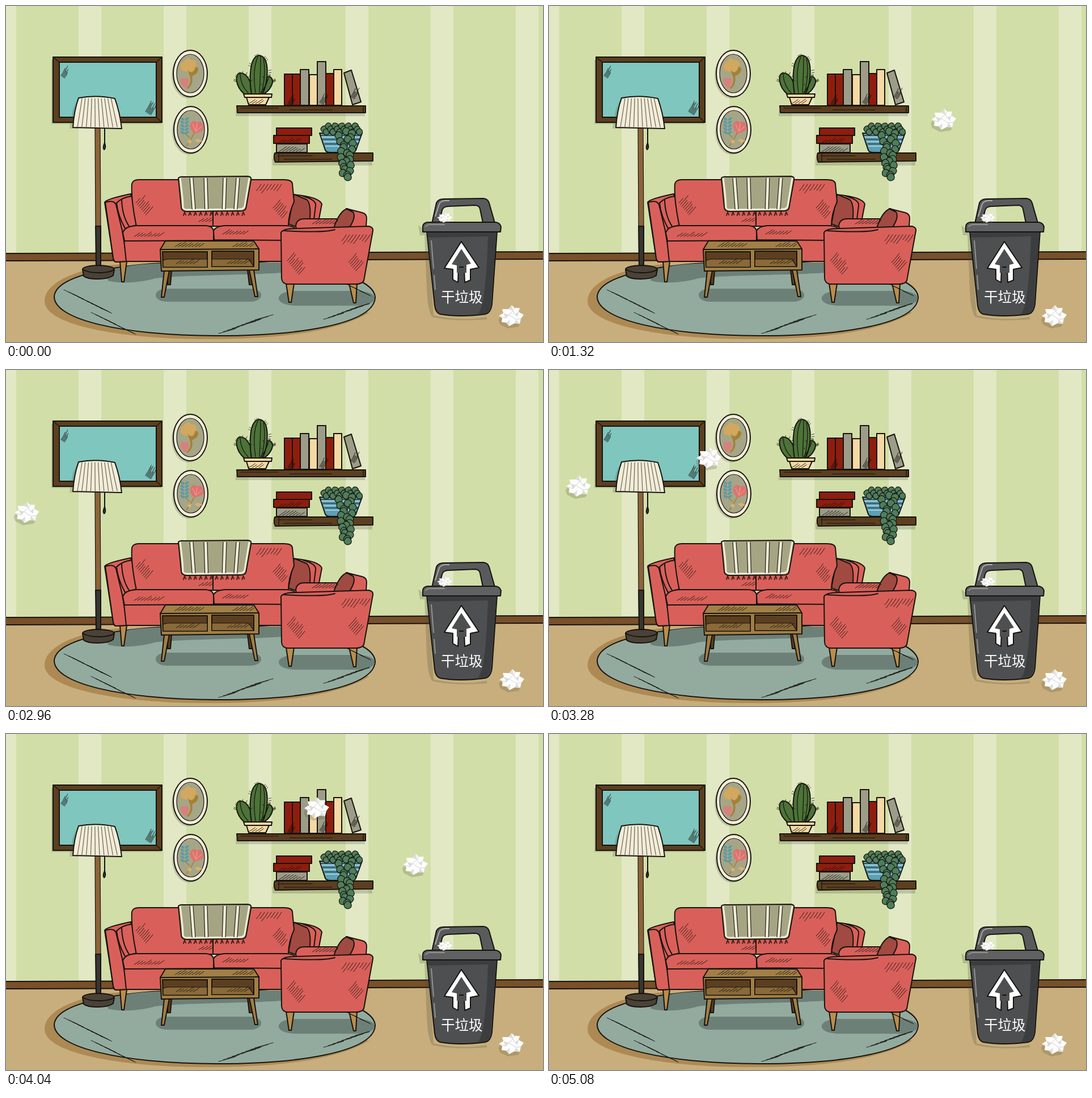
An HTML page that plays this animation: 947 by 592 pixels, repeating every 6920 ms.

```html
<!DOCTYPE html>
<html lang="zh">
<head>
<meta charset="utf-8">
<title>Living room</title>
<style>
html, body { margin: 0; width: 100%; height: 100%; overflow: hidden; background: #d2dea8; }
svg { display: block; width: 100vw; height: 100vh; }
.o { stroke: #17130f; stroke-width: 2; stroke-linejoin: round; stroke-linecap: round; }
.t { stroke: #17130f; stroke-width: 1.2; stroke-linejoin: round; stroke-linecap: round; }
.n { fill: none; }
.red { fill: #d9605a; } .dark { fill: #a04a42; }
.wood { fill: #5c3f20; } .oak { fill: #a27f46; } .leg { fill: #b98d4e; }
.cream { fill: #f2edd8; } .gray { fill: #9d9c88; } .book { fill: #8f1d0d; } .tan { fill: #f4d9a4; }
.cac { fill: #4c7338; } .vine { fill: #4f7e5b; }
.sh { fill: #3c4630; opacity: .22; }
</style>
</head>
<body>
<svg viewBox="0 0 947 592" preserveAspectRatio="none">
<defs>
  <g id="paper">
    <path fill="#5a5030" opacity=".24" d="M-23 7L-16-4L6-9L18 3L13 19L-6 22L-20 15Z"/>
    <path fill="#fdfdfd" d="M-22 0L-14-5L-16-12L-5-12L1-19L6-14L15-14L13-7L22-2L17 5L15 14L6 13L-4 18L-9 12L-17 11L-16 4Z"/>
    <path fill="#dcdddb" d="M-14-5L-5-2L-10 4ZM1-19L3-9L-5-12ZM13-7L6-3L11 2ZM-9 12L-2 7L-4 18ZM6 13L8 6L15 14Z"/>
    <path fill="none" stroke="#bfc0bd" stroke-width=".7" d="M-22 0L-10 4L-5-2L3-9L6-14M-5-2L8 6L17 5M6-3L3-9"/>
  </g>
</defs>

<rect width="947" height="592" fill="#d2dea8"/>
<g id="stripes" fill="#e1e8c3"></g>
<path fill="#c8ae7c" d="M0 449L947 446V592H0Z"/>
<path class="o" fill="#78502a" d="M-5 436L952 433V446L-5 449Z"/>

<!-- rug -->
<path fill="#ad8a54" d="M68 520C68 485 130 462 200 455L640 540C560 590 380 588 300 586C160 580 68 555 68 520Z"/>
<path class="o" fill="#93ab9f" d="M85 512C88 470 220 450 368 450C530 450 650 474 651 514C648 560 520 581 372 581C200 580 85 552 85 512Z"/>
<g fill="#6c8077">
  <path d="M176 470C200 456 260 452 330 452H486V470C440 474 300 474 262 480C240 487 200 490 180 484Z"/>
  <rect x="264" y="498" width="186" height="23" rx="20" ry="11"/>
  <rect x="481" y="502" width="169" height="26" rx="30" ry="12"/>
</g>

<!-- wall frame -->
<path class="sh" d="M80 95H274V208H80Z"/>
<path class="o wood" d="M83 90H275V205H83Z"/>
<path class="o" fill="#7fc6bf" d="M94 99H265V196H94Z"/>
<path class="t n" d="M83 90L94 99M275 90L265 99M275 205L265 196"/>

<g id="ovals"></g>
<path fill="#d2a85e" d="M309 113Q305 100 314 98Q319 88 326 95Q337 94 336 105Q334 114 322 117Z"/>
<path fill="#a78031" d="M320 112Q330 124 334 107Q343 108 336 119L328 124Q331 137 321 146L319 145Q328 134 324 123Z"/>
<path fill="#d9807c" d="M308 133Q307 124 315 128Q323 124 322 134L319 145Q309 142 308 133Z"/>
<path class="n" stroke="#a78031" stroke-width="1.600" d="M335 216Q329 232 318 247M324 232L313 222"/>
<path fill="#dd746f" d="M325 207Q331 199 337 205Q346 201 347 209Q352 219 341 222L333 225Q322 217 325 207Z"/>
<path class="n" stroke="#f0a49a" d="M329 208L335 221L337 207M335 221L345 212"/>
<path fill="#d9b06b" d="M320 238l5-3 3 5-5 3zM332 236l7-2 8 4-8 3z"/>
<g id="blueLeaves" fill="#5b9ca8"></g>

<!-- upper shelf -->
<path class="sh" d="M405 184H633V194H405Z"/>
<path class="o wood" d="M407 176H634V188H408Z"/>
<path class="t n" d="M414 180H480M500 183H575M630 177V187"/>
<g class="o cac">
  <path d="M420 155C405 142 402 120 413 118C426 118 434 136 435 155Z"/>
  <path d="M445 155C444 138 455 122 466 125C476 132 465 151 452 156Z"/>
  <path d="M433 156C428 124 430 88 447 87C465 90 464 130 452 156Z"/>
</g>
<path class="t n" d="M440 153Q434 112 444 90M447 153Q449 116 449 89M451 153Q459 118 454 93M427 153Q414 140 413 121M449 153Q458 143 463 127"/>
<g id="spines" class="n" stroke="#26301a" stroke-width=".9"></g>
<path class="o tan" d="M424 161H464L458 174H428Z"/>
<path class="o tan" d="M419 155H469L468 161H421Z"/>
<g id="books"></g>
<path class="o gray" d="M596 118L609 113L626 169L611 174Z"/>

<!-- lower shelf -->
<path class="sh" d="M470 268H646V281H470Z"/>
<path class="o wood" d="M474 259H647V273L475 275Q471 267 474 259Z"/>
<path class="t n" d="M480 264H540M490 270H575M481 260V274"/>
<path class="o" fill="#5ba0b5" d="M553 224H628L617 254Q615 258 608 258H572Q565 258 563 254Z"/>
<path class="n" stroke="#b9dde2" stroke-width="1.500" d="M556 231H624M560 239H622M563 247H618"/>
<path class="t n" d="M555 228H626M559 235H623M562 243H620"/>
<g id="vine"></g>

<!-- lamp -->
<path class="sh" d="M112 216L118 182L128 160V216Z"/>
<path class="t" fill="#8d6439" d="M157 214H166L167 388H158Z"/>
<path class="o" fill="#393530" d="M158 388H167V461H159Z"/>
<path class="o" fill="#4b4237" d="M135 464Q136 458 163 457Q190 458 191 464L189 475Q180 481 162 481Q143 481 137 476Z"/>
<path class="o n" d="M135 464Q145 470 163 470Q184 470 191 464M174 216V242"/>
<path class="o" fill="#4b4237" d="M174 241Q170 250 173 253Q177 251 174 241Z"/>
<path class="o cream" d="M128 162Q160 156 192 163Q201 188 204 216Q160 215 118 214Q120 184 128 162Z"/>
<g id="pleats" class="t n" style="stroke:#6a6350"></g>

<!-- sofa -->
<g class="o">
  <path class="leg" d="M201 450H213L208 486H204Z"/>
  <path class="red" d="M174 346Q176 340 220 331L230 390L212 450L194 451Q190 450 189 444Z"/>
  <path class="red" d="M175 346Q190 341 194 350L205 396L214 450L194 451Q190 450 189 444Z"/>
  <path class="red" d="M195 347Q205 337 222 335L230 386L210 392Q197 368 195 347Z"/>
  <path class="n" d="M204 342Q205 370 217 388"/>
  <path class="red" d="M506 332Q552 336 557 349L551 380H512Z"/>
  <path class="n" d="M524 335Q548 342 546 352L543 376"/>
  <path class="dark" d="M508 332L530 341Q538 347 536 374L512 389L498 384Z"/>
  <path class="red" d="M222 313Q224 306 234 306H490Q504 306 505 313L508 345Q498 366 498 388H230Q220 340 222 313Z"/>
  <path class="n" d="M365 360V386"/>
  <path class="red" d="M208 412H490L486 450H212Z"/>
  <path class="red" d="M206 400Q209 388 230 387H352Q366 388 366 398V413L209 414Z"/>
  <path class="red" d="M366 396Q370 388 385 387H492Q512 387 512 397L505 413L367 412Z"/>
</g>
<path class="o" fill="#a5a584" d="M304 303Q307 300 313 301L427 300Q434 301 432 307L423 357Q420 362 411 361L318 362Q309 361 309 354Z"/>
<path class="n" stroke="#f2edd8" stroke-width="3" d="M307 303Q312 340 312 355Q313 359 320 359L411 358Q420 358 421 352L429 303"/>
<g id="bands" class="n"></g>
<g id="tassels" class="o n" style="stroke:#4a1d18"></g>

<!-- table -->
<g class="o">
  <path class="wood" d="M285 466H292L290 491H285ZM426 465H432L434 491H429Z"/>
  <path class="oak" d="M279 466H288L279 513H274ZM429 465H437L444 512H439Z"/>
  <path class="oak" d="M281 414H437L446 428V465L274 467L272 429Z"/>
  <path class="n" d="M272 429L446 428"/>
  <path class="wood" d="M276 433H355V460H277ZM363 432H437V459H363Z"/>
</g>
<path fill="#8a6a38" class="t" d="M277 448L285 446H355V460H277ZM363 446H428L437 459H363Z"/>

<!-- armchair -->
<g class="o">
  <path class="leg" d="M494 489H508L503 522H499ZM605 489H619L617 523H613Z"/>
  <path class="red" d="M511 388Q512 375 526 375H588V392H512Z"/>
  <path class="dark" d="M578 391Q588 361 602 357L618 366L608 391Z"/>
  <path class="red" d="M600 357L628 364Q636 366 636 374L635 391H605Q618 372 612 363Z"/>
  <path class="red" d="M485 399Q489 392 512 392L640 388Q648 390 647 396L631 484Q628 490 617 490H496Q487 489 486 480Z"/>
  <path class="n" d="M490 396Q560 400 580 394"/>
</g>
<g id="hatches" class="t n"></g>

<!-- bin -->
<path class="sh" d="M727 386L744 400L754 545Q800 556 848 548V552Q790 557 752 548Q744 540 742 500L738 404H730Z"/>
<path class="o" fill="#595a5b" fill-rule="evenodd" d="M751 383L759 347Q762 340 772 340L842 339Q850 340 852 347L862 382ZM764 381L769 360Q771 353 780 353L828 351Q835 352 836 358L841 382Z"/>
<path class="n" stroke="#a6aaa9" stroke-width="2" d="M757 371L764 349Q766 344 774 343H782"/>
<path class="o" fill="#4e4f50" d="M742 397H866L857 525Q855 541 845 543Q800 549 766 543Q758 541 756 528Z"/>
<path fill="#3c3d3e" d="M743 398H865L855 525Q853 540 845 542H832Q846 532 850 406L745 408Z"/>
<path class="o" fill="#606162" d="M735 388Q736 382 743 381H864Q871 382 873 389L872 398H735Z"/>
<path class="n" stroke="#909494" stroke-width="2" d="M740 389Q742 385 748 385H774M750 413L754 463M755 474L757 500"/>
<path class="o" fill="#fff" d="M803 415L834 461L819 464V483L809 487L808 460H798L797 487L788 482V464L773 462Z"/>
<path fill="#4e4f50" d="M803 428L820 454L812 456V470H807V459H799V470H795V457L786 455Z"/>
<text x="767" y="522" fill="#fff" font-size="24.500" font-weight="500" font-family="'Noto Sans CJK SC','Noto Sans CJK',sans-serif">干垃圾</text>
<use href="#paper" transform="translate(773.500 373) scale(.6 .48)"/>

<use id="floor" href="#paper"/>
<g id="flyers"></g>
</svg>
<script>
const $ = id => document.getElementById(id);
const range = (n, f) => Array.from({ length: n }, (_, i) => f(i)).join('');
let seed = 7;
const rnd = () => (seed = seed * 16807 % 2147483647) / 2147483647;

$('stripes').innerHTML = range(7, i =>
  `<rect x="${150 * i - 22 + (i > 3 ? 21 : 0)}" width="40" height="434"/>`);

// Pen hatching: n strokes, stepping by sx,sy, each about dx,dy long
const hatch = (sx, sy, dx, dy) => (x, y, n = 7) => {
  const d = range(n, i => {
    const k = .6 + rnd() * .6;
    return `M${x + i * sx} ${y + i * sy}q${dx * k * .5 + 1} ${dy * k * .5} ${dx * k} ${dy * k}`;
  });
  $('hatches').innerHTML += `<path stroke-width=".9" d="${d}"/>`;
};
const rise = hatch(2.5, 3, 12, -14), fall = hatch(6, 0, -10, 14), flat = hatch(6, 0, 11, -7),
  glass = hatch(1.5, 1, 9, -16), rug = hatch(8, 4, 24, 11), rim = hatch(8, -3, 28, -8);

rise(229, 347, 8); rise(471, 356); rise(496, 449, 9); rise(604, 452, 6);
fall(450, 314); fall(600, 403, 8);
flat(226, 406, 8); flat(382, 402); flat(340, 380, 4); flat(540, 384); flat(298, 424, 8);
flat(400, 424, 6); flat(300, 454, 6); flat(390, 454, 6); flat(482, 256); flat(482, 240, 6); flat(428, 172, 4);
glass(97, 123, 5); glass(246, 186); glass(497, 172, 5); glass(553, 170, 5); glass(608, 160, 5);
rug(102, 500, 9); rug(150, 540, 8); rug(600, 490, 4); rim(375, 577, 9); rim(560, 552, 8);

$('ovals').innerHTML = [[325, 119], [326, 218]].map(([x, y]) =>
  `<ellipse class="sh" cx="${x - 3}" cy="${y + 3}" rx="30" ry="41"/>
   <ellipse class="o cream" cx="${x}" cy="${y}" rx="30" ry="41"/>
   <ellipse class="t" fill="#a5a587" cx="${x}" cy="${y}" rx="24" ry="34"/>`).join('');

$('blueLeaves').innerHTML = range(10, i => {
  const side = i % 2 ? 1 : -1;
  return `<ellipse rx="4" ry="2" transform="translate(${315 + side * 4} ${199 + (i >> 1) * 6}) rotate(${-side * 35})"/>`;
});

const lobes = [[447, 118, 16, 29], [418, 136, 12, 16], [462, 139, 10, 14]];
$('spines').innerHTML = `<path d="${range(30, i => {
  const [x, y, rx, ry] = lobes[i % 3];
  const ux = Math.cos(i * 2.4), uy = -Math.abs(Math.sin(i * 2.4));
  return `M${x + ux * rx} ${y + uy * ry}l${ux * 5} ${uy * 4 - 1}`;
})}"/>`;

const book = (cls, x, y, w, h) => `<rect class="o ${cls}" x="${x}" y="${y}" width="${w}" height="${h}"/>`;
$('books').innerHTML = [
  ['book', 491, 120], ['book', 505, 120], ['gray', 519, 112], ['tan', 535, 121],
  ['gray', 549, 98], ['book', 564, 119], ['tan', 578, 112]
].map(([c, x, y]) => book(c, x, y, c === 'gray' ? 15 : 14, 175 - y)).join('') +
  book('book', 477, 215, 62, 13) + book('book', 472, 228, 63, 14) + book('gray', 477, 243, 54, 15);

const leaf = (x, y, r) => `<path class="t vine" transform="translate(${x} ${y}) rotate(${rnd() * 140 - 70})"
  d="M0 ${-r}Q${r} ${-r} ${r} 0Q${r * .7} ${r} 0 ${r}Q${-r} ${r * .8} ${-r} 0Q${-r} ${-r} 0 ${-r}Z"/>`;
$('vine').innerHTML =
  range(17, i => leaf(561 + i * 3.9, 217 + Math.sin(i * 2.1) * 6, 5.5)) +
  range(24, i => leaf(600 + Math.sin(i * 2.3) * (14 - i * .35), 221 + i * 3.5, 6.5));

$('pleats').innerHTML = `<path d="${range(10, i => `M${134 + i * 5.7} 163Q${130 + i * 6.8} 190 ${126 + i * 7.8} 213`)}"/>`;
$('bands').innerHTML = [327, 352, 386, 409].map(x => {
  const d = `d="M${x} 303L${x + (368 - x) / 10} 358"`;
  return `<path stroke="#17130f" stroke-width="7" ${d}/><path stroke="#a5a584" stroke-width="5" ${d}/>
    <path stroke="#f2edd8" stroke-width="4" ${d}/>`;
}).join('');
$('tassels').innerHTML = `<path d="${range(12, i => `M${315 + i * 9.4} 363l-2 6m2-6l2 5`)}"/>`;

// Smooth curve through [time, x, y] points
function along(track, t) {
  const last = track.length - 1;
  if (t < track[0][0] || t > track[last][0]) return null;
  let i = 0;
  while (i < last - 1 && t >= track[i + 1][0]) i++;
  const a = track[i], b = track[i + 1], p = track[i - 1] || a, q = track[i + 2] || b;
  const h = b[0] - a[0], u = (t - a[0]) / h;
  return [1, 2].map(k => {
    const m = (b[k] - p[k]) / (b[0] - p[0]) * h, n = (q[k] - a[k]) / (q[0] - a[0]) * h;
    return a[k] + u * (m + u * (3 * (b[k] - a[k]) - 2 * m - n + u * (2 * (a[k] - b[k]) + m + n)));
  });
}

const toss = [[200, -56, 290], [640, 282, 155], [880, 460, 128], [1040, 565, 138],
  [1320, 696, 200], [1600, 773, 321], [1640, 786, 339], [1720, 798, 355]];
const lob = [[3160, -32, 252], [3280, 52, 205], [3560, 248, 124], [3680, 340, 97], [3820, 439, 88],
  [4280, 657, 187], [4400, 700, 220], [4640, 774, 319]];
const bounce = [[4641, 774, 318], [4780, 838, 273], [5000, 943, 254], [5080, 984, 264]];
const flyers = [[toss, 0], [toss, 2640], [lob, 0], [bounce, 0]].map(([track, delay]) => {
  const el = document.createElementNS('http://www.w3.org/2000/svg', 'use');
  el.setAttribute('href', '#paper');
  $('flyers').append(el);
  return { track, delay, el };
});

const LOOP = 6920, TICK = 40, SHAKE = 320;
const shakes = [160, 680, 2320, 2840];

function draw(ms) {
  const t = Math.floor(ms % LOOP / TICK) * TICK;
  const start = shakes.find(s => t >= s && t <= s + SHAKE);
  const p = start === undefined ? 0 : (t - start) / SHAKE;
  const sway = Math.sin(3 * Math.PI * p * p * (3 - 2 * p));
  $('floor').setAttribute('transform', `translate(${891 + sway * 6} 546) rotate(${sway * 5})`);
  for (const { track, delay, el } of flyers) {
    const pos = along(track, t - delay);
    el.style.display = pos ? '' : 'none';
    if (pos) el.setAttribute('transform', `translate(${pos[0].toFixed(2)} ${pos[1].toFixed(2)})`);
  }
}

const begin = performance.now();
(function tick() {
  draw(performance.now() - begin);
  requestAnimationFrame(tick);
})();
</script>
</body>
</html>
```
